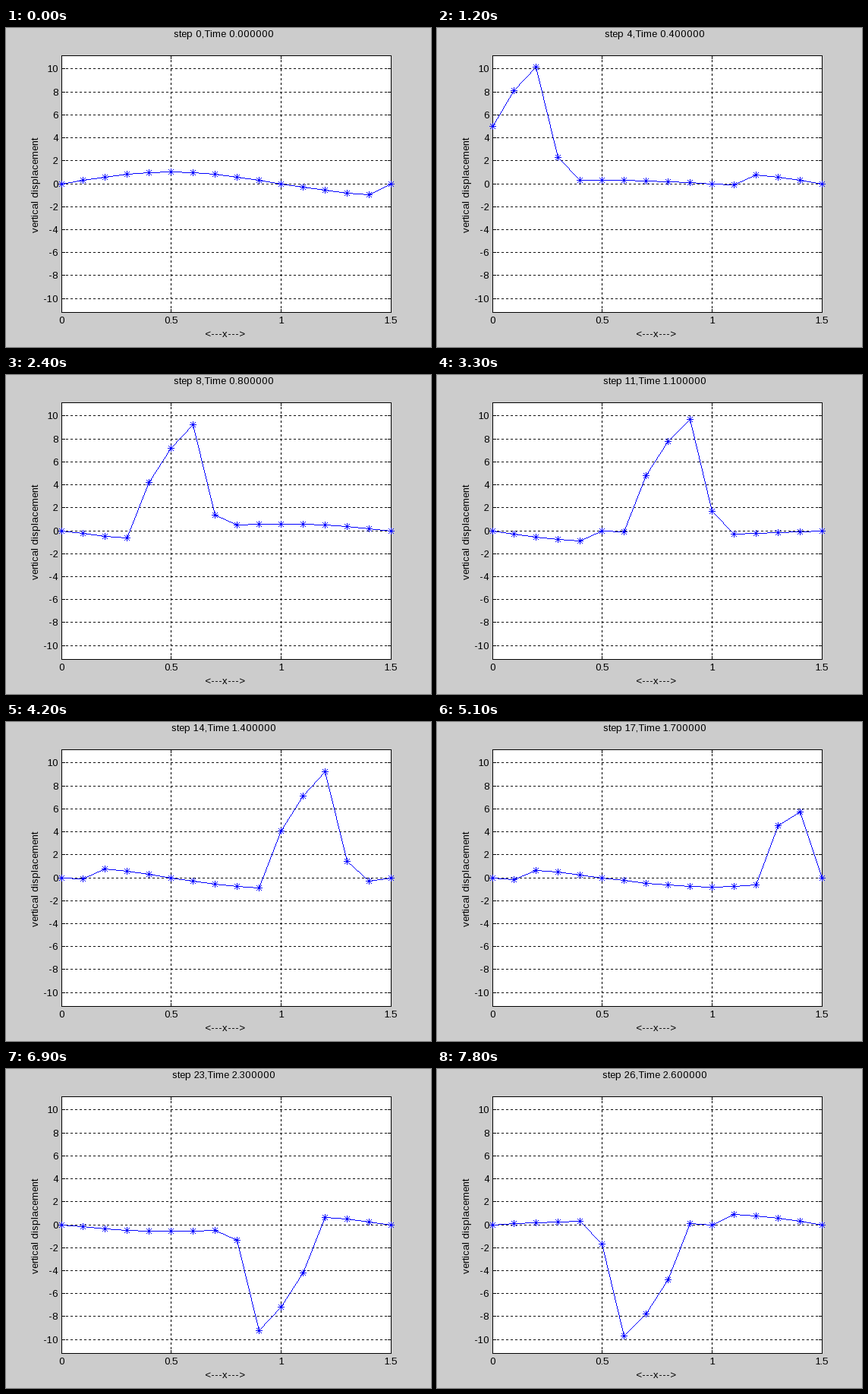
These frames come from a looping animation (560x420 px, 8 s). A matplotlib script:

```python
import numpy as np
import matplotlib.pyplot as plt
from matplotlib.animation import FuncAnimation

WIDTH, HEIGHT, DPI = 560, 420, 100
LEFT, RIGHT, TOP, BOTTOM = 73, 507, 36, 374    # plot box in pixels
ZERO_Y, UNIT_Y = 205.0, 15.12
STEPS, DT, HOLD = 27, 0.1, 3                   # each step is held for three ticks
TICK, ARM, DIAGONAL, DOT = 4, 4, 3, 3
GREY, WHITE, BLACK, BLUE = (204,) * 3, (255,) * 3, (0,) * 3, (0, 0, 255)

plt.rcParams.update({
    "font.family": "Liberation Sans",
    "font.size": 13 * 72 / DPI,
    "text.hinting": "force_autohint",
    "text.hinting_factor": 1,
    "text.kerning_factor": 0,
})


def to_px(x, y):
    """Plot coordinates to whole pixels."""
    px = LEFT + np.asarray(x) * (RIGHT - LEFT) / 1.5
    py = ZERO_Y - np.asarray(y) * UNIT_Y
    return np.floor(px + 1e-6).astype(int), np.floor(py + 1e-6).astype(int)


def simulate():
    """Leapfrog wave equation at Courant number one; a pulse enters at x = 0."""
    inlet = np.zeros(STEPS)
    inlet[1:5] = 2, 10, 8, 5
    prev = np.sin(np.pi * x_nodes)
    shown = prev.copy()
    shown[-1] = 0
    history = [shown]
    cur = np.zeros_like(prev)
    cur[1:-1] = (prev[2:] + prev[:-2]) / 2
    cur[0] = inlet[1]
    history.append(cur)
    for n in range(2, STEPS):
        new = np.zeros_like(cur)
        new[1:-1] = cur[2:] + cur[:-2] - prev[1:-1]
        new[0] = inlet[n]
        prev, cur = cur, new
        history.append(cur)
    return history


def line(canvas, x0, y0, x1, y1, color=BLACK, dotted=False):
    """A hard-edged line, one pixel wide."""
    count = max(abs(x1 - x0), abs(y1 - y0)) + 1
    xs = np.floor(np.linspace(x0, x1, count) + 0.5).astype(int)
    ys = np.floor(np.linspace(y0, y1, count) + 0.5).astype(int)
    on = np.arange(count) // DOT % 2 == 0 if dotted else slice(None)
    canvas[ys[on], xs[on]] = color


def star(canvas, x, y):
    line(canvas, x - ARM, y, x + ARM, y, BLUE)
    line(canvas, x, y - ARM, x, y + ARM, BLUE)
    for d in (-DIAGONAL, DIAGONAL):
        line(canvas, x - DIAGONAL, y - d, x + DIAGONAL, y + d, BLUE)


def plot_box():
    canvas = np.empty((HEIGHT, WIDTH, 3), np.uint8)
    canvas[:] = GREY
    canvas[TOP:BOTTOM + 1, LEFT:RIGHT + 1] = WHITE
    for value in range(-10, 11, 2):
        y = int(to_px(0, value)[1])
        line(canvas, LEFT, y, RIGHT, y, dotted=True)
        line(canvas, LEFT, y, LEFT + TICK, y)
        line(canvas, RIGHT - TICK, y, RIGHT, y)
    for value in (0.5, 1):
        x = int(to_px(value, 0)[0])
        line(canvas, x, BOTTOM, x, TOP, dotted=True)
        line(canvas, x, BOTTOM, x, BOTTOM - TICK)
        line(canvas, x, TOP, x, TOP + TICK)
    for x in (LEFT, RIGHT):
        line(canvas, x, TOP, x, BOTTOM)
    for y in (TOP, BOTTOM):
        line(canvas, LEFT, y, RIGHT, y)
    return canvas


def label(x, y, text, **style):
    return ax.text(x, y, text, va="baseline", **{"ha": "center", **style})


x_nodes = np.arange(16) / 10
history = simulate()
background = plot_box()

fig = plt.figure(figsize=(WIDTH / DPI, HEIGHT / DPI), dpi=DPI, facecolor="#cccccc")
ax = fig.add_axes([0, 0, 1, 1])
ax.axis("off")
stage = ax.imshow(background, extent=(0, WIDTH, HEIGHT, 0), aspect="auto",
                  interpolation="nearest")

for value in range(-10, 11, 2):
    label(69, to_px(0, value)[1] + 5, str(value), ha="right")
for value in (0, 0.5, 1, 1.5):
    label(to_px(value, 0)[0] + 0.5, 389, f"{value:g}")
label(288.5, 407, "<---x--->")
label(43, 206.5, "vertical displacement", rotation=90, rotation_mode="anchor")
title = label(287, 12, "")


def draw(tick):
    step = tick // HOLD
    canvas = background.copy()
    nodes = list(zip(*to_px(x_nodes, history[step])))
    for start, end in zip(nodes, nodes[1:]):
        line(canvas, *start, *end, BLUE)
    for node in nodes:
        star(canvas, *node)
    stage.set_data(canvas)
    title.set_text(f"step {step},Time {step * DT:.6f}")
    return stage, title


anim = FuncAnimation(fig, draw, frames=80, interval=100, repeat=True, repeat_delay=0)
plt.show()
```
